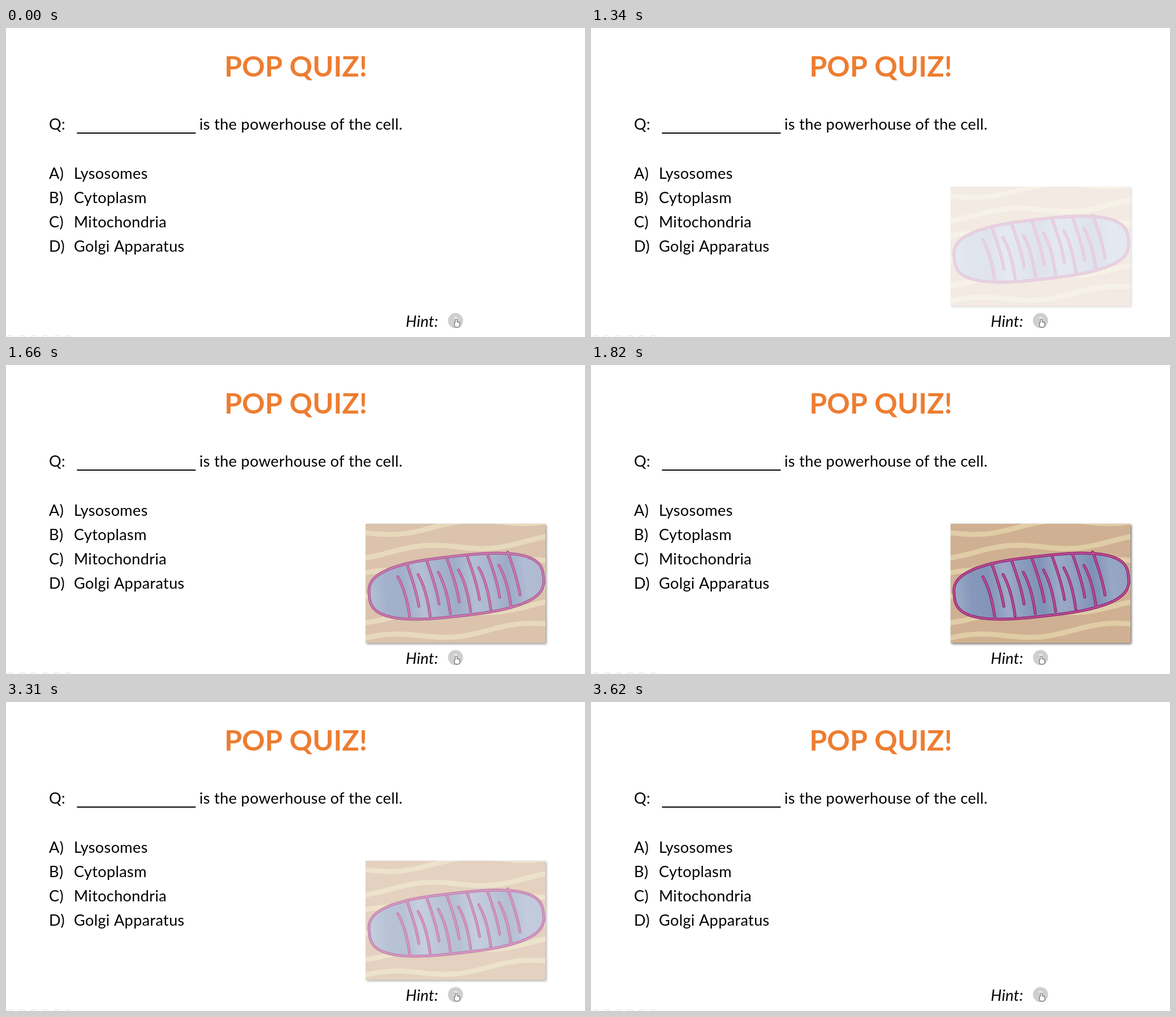
These frames come from a looping animation (1024x547 px, 4.4 s). An HTML page with a canvas:

```html
<!DOCTYPE html>
<html lang="en">
<head>
<meta charset="utf-8">
<title>Pop quiz</title>
<style>
  html, body { margin: 0; width: 100%; height: 100%; overflow: hidden; background: #fff; }
  canvas { display: block; width: 1024px; height: 547px; }
</style>
</head>
<body>
<canvas id="stage" width="1024" height="547"></canvas>
<script>
const LOOP = 4400;
const W = 1024, H = 547;
const PHOTO = { x: 636, y: 281, w: 318, h: 211 };
const ctx = document.getElementById('stage').getContext('2d');

function layer(paint) {
  const c = document.createElement('canvas');
  c.width = W;
  c.height = H;
  paint(c.getContext('2d'));
  return c;
}

function text(g, str, x, y, style = '', size = 27.2) {
  g.font = `${style} ${size}px Lato, sans-serif`;
  g.fillText(str, x, y);
}

function disc(g, x, y, r, color) {
  g.fillStyle = color;
  g.beginPath();
  g.arc(x, y, r, 0, Math.PI * 2);
  g.fill();
}

function paintSlide(g) {
  g.fillStyle = '#fff';
  g.fillRect(0, 0, W, H);

  g.fillStyle = '#ed7d31';
  g.textAlign = 'center';
  text(g, 'POP QUIZ!', 512.5, 86, 'bold', 50.3);

  g.fillStyle = '#000';
  g.textAlign = 'left';
  g.letterSpacing = '0.3px';
  text(g, 'Q:', 76, 180);
  g.fillRect(125.5, 185, 210, 2);
  text(g, 'is the powerhouse of the cell.', 342, 180);
  ['Lysosomes', 'Cytoplasm', 'Mitochondria', 'Golgi Apparatus'].forEach((answer, i) => {
    const y = 266.5 + i * 43.1;
    text(g, 'ABCD'[i] + ')', 76, y);
    text(g, answer, 120, y);
  });
  text(g, 'Hint:', 707, 529, 'italic');

  g.strokeStyle = '#dedede';
  g.lineWidth = 1;
  for (let i = 0; i < 6; i++) {
    g.beginPath();
    g.arc(8 + i * 20.4, 553.5, 9, 0, Math.PI * 2);
    g.stroke();
  }

  disc(g, 795, 518, 13.4, '#cfcfcf');
  g.fillStyle = '#fff';
  g.textAlign = 'center';
  g.letterSpacing = '0px';
  text(g, '?', 795, 523, 'bold', 15);
}

// Superellipse around the origin
function capsule(a, b, n) {
  const p = new Path2D();
  const bend = v => Math.sign(v) * Math.abs(v) ** (2 / n);
  for (let i = 0; i < 120; i++) {
    const k = i * Math.PI / 60;
    p.lineTo(a * bend(Math.cos(k)), b * bend(Math.sin(k)));
  }
  p.closePath();
  return p;
}

// Pale wavy streaks across the surrounding tissue
function paintTissue(g) {
  const { x, y, w, h } = PHOTO;
  g.strokeStyle = '#e0cda6';
  g.lineWidth = 9;
  for (let i = 0; i < 6; i++) {
    g.beginPath();
    for (let u = 0; u <= w; u += 6) {
      g.lineTo(x + u, y + 16 + i * 38 - u * 0.08 + 7 * Math.sin(u / 38 + i * 2));
    }
    g.stroke();
  }
}

function paintBody(g) {
  g.translate(796.5, 391.5);
  g.rotate(-0.112);
  const membranes = capsule(155, 53, 2.8);

  const tone = g.createLinearGradient(-155, 0, 155, 0);
  for (let i = 0; i <= 10; i++) {
    const light = 65 + 5 * Math.cos(i * 2);
    tone.addColorStop(i / 10, `hsl(220 28% ${light}%)`);
  }
  g.fillStyle = tone;
  g.fill(membranes);

  // Folds reach in from the upper and lower edge by turns
  for (let i = 0; i < 12; i++) {
    const u = -101 + i * 18;
    const top = i % 2 ? -50 : -28;
    const bottom = i % 2 ? 28 : 47;
    membranes.moveTo(u, top);
    membranes.quadraticCurveTo(u + 12, 0, u + 13, bottom);
  }
  const lines = [['#8c2b70', 5], ['#c7509b', 2]];
  for (const [color, width] of lines) {
    g.strokeStyle = color;
    g.lineWidth = width;
    g.stroke(membranes);
  }
}

// The micrograph, reduced to flat tones
function paintPhoto(g) {
  const { x, y, w, h } = PHOTO;
  g.shadowColor = 'rgba(0,0,0,0.55)';
  g.shadowBlur = 4;
  g.shadowOffsetX = g.shadowOffsetY = 2;
  g.fillStyle = '#d0b092';
  g.fillRect(x, y, w, h);
  g.shadowColor = 'transparent';

  g.beginPath();
  g.rect(x, y, w, h);
  g.clip();
  g.lineCap = g.lineJoin = 'round';
  paintTissue(g);
  paintBody(g);
}

// Hand pointer: a raised finger over a rounded palm
function drawHand(g) {
  g.beginPath();
  g.roundRect(795.2, 516, 2.4, 9, 1.2);
  g.roundRect(793.5, 521, 8.7, 8, 2.5);
  g.strokeStyle = '#333';
  g.lineWidth = 1.6;
  g.stroke();
  g.fillStyle = '#fff';
  g.fill();
}

const slide = layer(paintSlide);
const photo = layer(paintPhoto);

const stepped = (t, start, tick, steps) =>
  Math.min(1, Math.max(0, Math.floor((t - start) / tick) + 1) / steps);

const photoAlpha = t => stepped(t, 1260, 80, 8) - stepped(t, 3150, 78.3, 7);

const clicked = t => (t >= 1190 && t < 1340) || (t >= 2990 && t < 3150);

function draw(t) {
  ctx.globalAlpha = 1;
  ctx.drawImage(slide, 0, 0);
  ctx.globalAlpha = photoAlpha(t);
  ctx.drawImage(photo, 0, 0);
  ctx.globalAlpha = 1;
  if (clicked(t)) disc(ctx, 796.5, 517.2, 6.6, '#f1e43c');
  drawHand(ctx);
}

let start;
function tick(now) {
  start ??= now;
  draw((now - start) % LOOP);
  requestAnimationFrame(tick);
}
draw(0);
requestAnimationFrame(tick);
</script>
</body>
</html>
```
